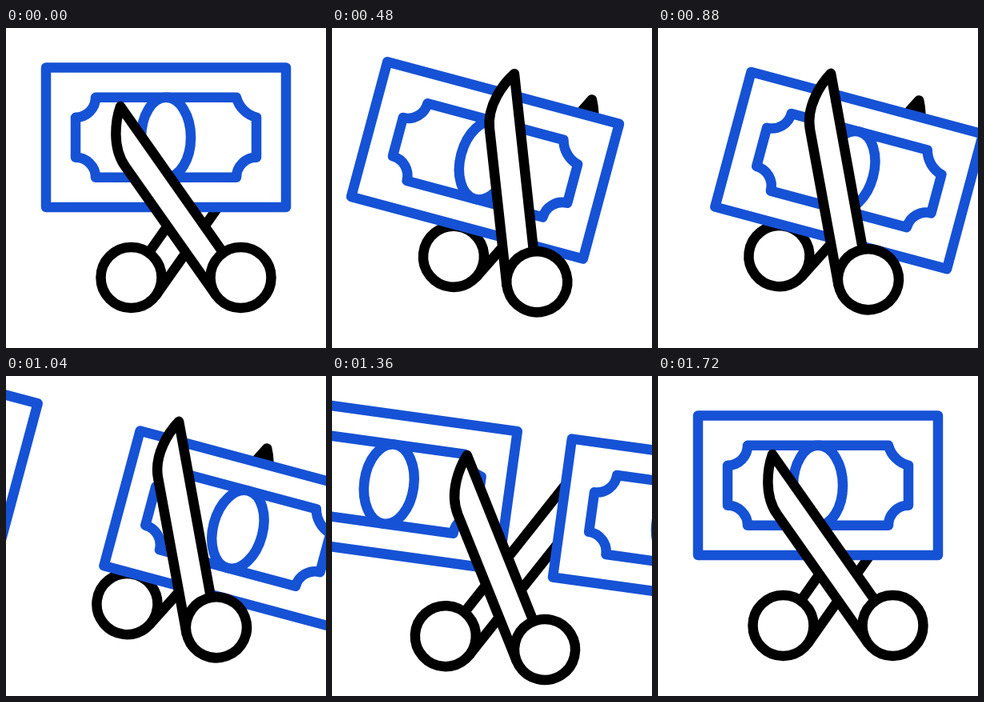
Animation, 400 px wide and 400 px high, one loop 2000 ms. Source, as an HTML page:

```html
<!DOCTYPE html>
<html lang="en">
<head>
<meta charset="utf-8">
<title>Scissors and banknote</title>
<style>
  html, body { margin: 0; width: 100%; height: 100%; overflow: hidden; background: #fff; }
  svg { display: block; width: 100vw; height: 100vh; }
</style>
</head>
<body>
<svg viewBox="0 0 400 400" fill="#fff" stroke-width="12.5" stroke-linecap="round" stroke-linejoin="round">
  <defs>
    <g id="note" stroke="#1652d5">
      <rect x="-150" y="-87.3" width="300" height="174.6"/>
      <path d="M-88-50H88A35 35 0 0 0 113-25V25A25 25 0 0 0 88 50H-88A25 25 0 0 0-113 25V-25A25 25 0 0 0-88-50Z"/>
      <ellipse rx="31" ry="50"/>
    </g>
    <g id="blade" stroke="#000" transform="translate(-225 -247)">
      <path d="M271.6 281L143 98C137 115 132 149 149 173L262.5 334"/>
      <circle cx="293.5" cy="312" r="38"/>
    </g>
  </defs>
  <g id="scene">
    <g id="back"><use href="#blade"/></g>
    <use id="leaving" href="#note"/>
    <use id="arriving" href="#note"/>
    <g id="front"><use href="#blade"/></g>
  </g>
</svg>
<script>
const LOOP = 2000;
const el = id => document.getElementById(id);
const scene = el('scene'), back = el('back'), front = el('front');
const leaving = el('leaving'), arriving = el('arriving');

// Eased progress from 0 to 1 between times a and b
function ease(t, a, b) {
  const u = Math.min(1, Math.max(0, (t - a) / (b - a)));
  return u * u * (3 - 2 * u);
}

// Smooth curve through [time, value] points, at rest at both ends
function track(t, keys) {
  const n = keys.length - 1;
  if (t <= keys[0][0]) return keys[0][1];
  if (t >= keys[n][0]) return keys[n][1];
  const slope = i => i === 0 || i === n ? 0 :
    (keys[i + 1][1] - keys[i - 1][1]) / (keys[i + 1][0] - keys[i - 1][0]);
  let i = 0;
  while (t > keys[i + 1][0]) i++;
  const [t0, v0] = keys[i], [t1, v1] = keys[i + 1];
  const span = t1 - t0, u = (t - t0) / span, w = 1 - u;
  return w * w * (1 + 2 * u) * v0 + u * u * (3 - 2 * u) * v1 +
    span * u * w * (w * slope(i) - u * slope(i + 1));
}

const OUT = [[620, 0], [720, 5.5], [1040, 101.5], [1200, 179.5], [1480, 293], [1720, 372]];
const IN = [[640, -480], [1040, -331], [1200, -232], [1480, -53], [1720, 0]];

const move = (node, x, y, angle = 0, extra = '') =>
  node.setAttribute('transform', `translate(${x} ${y}) rotate(${angle}) ${extra}`);

function draw(t) {
  const tilt = ease(t, 80, 480) - ease(t, 1210, 1522);
  move(scene, 200 - 8.5 * tilt * (2.76 - 1.76 * tilt), 136.8 + 28.6 * tilt, 15 * tilt);

  move(leaving, track(t, OUT), 0);
  move(arriving, track(t, IN), 0);

  const push = ease(t, 80, 400);
  const x = 25 + 25.8 * (push - ease(t, 1150, 1560));
  const y = 110.2 - 58.3 * (push - ease(t, 1120, 1390));

  // Blades snap shut, relax into a hold, then open again
  const snap = ease(t, 80, 300), relax = ease(t, 300, 600), open = ease(t, 1120, 1640);
  const swing = (peak, hold) => peak * snap + (hold - peak) * relax - hold * open;
  const lift = relax - open;
  move(back, x, y, swing(-9.8, -8.2), 'scale(-1 1)');
  move(front, x + 0.3 * lift, y - 2.3 * lift, swing(21.6, 9.8));
}

function tick() {
  draw(performance.now() % LOOP);
  requestAnimationFrame(tick);
}
tick();
</script>
</body>
</html>
```
